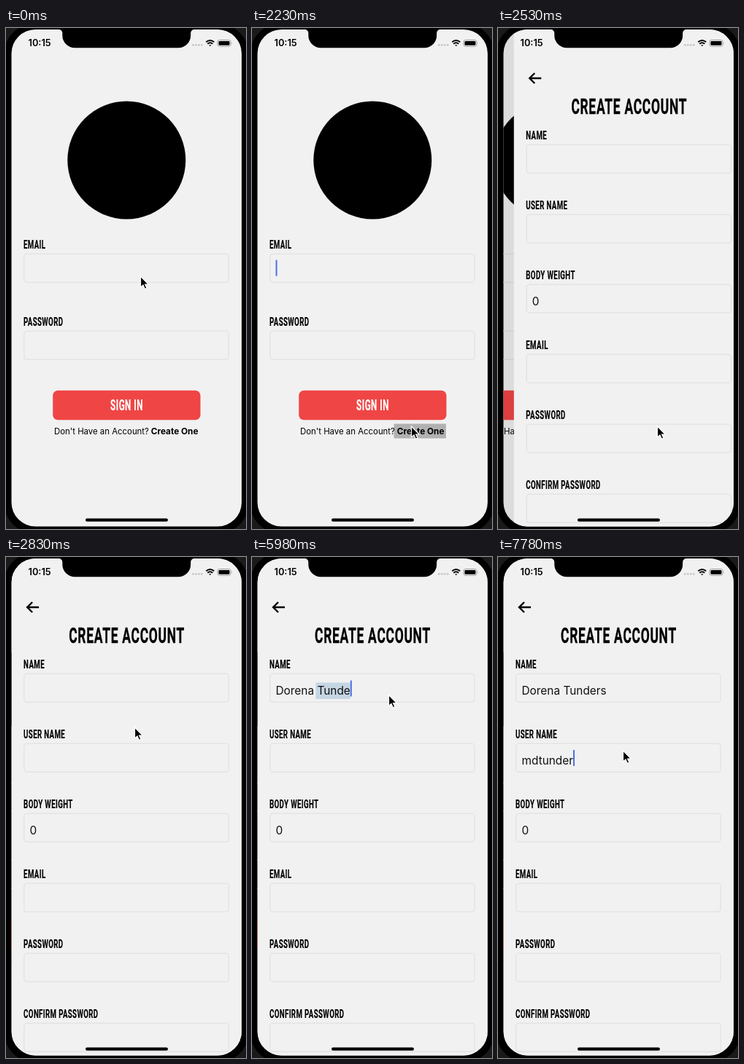
Animation, 329 px wide and 688 px high, one loop 8000 ms. Source, as an HTML page:

```html
<!DOCTYPE html>
<html lang="en">
<head>
<meta charset="utf-8">
<title>Create account</title>
<style>
html, body { margin: 0; width: 100%; height: 100%; overflow: hidden; background: #000; }
svg { display: block; width: 329px; height: 688px; }
text { font-family: Inter, "Liberation Sans", sans-serif; white-space: pre; }
.caps {
  font-family: Roboto, "Liberation Sans", sans-serif; font-weight: 700; letter-spacing: .04em;
  fill: currentColor; stroke: currentColor; stroke-width: .012em;
}
.input { font-size: 15.4px; fill: #111; }
.box { fill: none; stroke: #e4e4e6; stroke-width: 1.5; }
</style>
</head>
<body>
<svg viewBox="0 0 329 688">
  <defs>
    <clipPath id="glass"><rect x="7.5" y="2" width="315.5" height="682.5" rx="33"/></clipPath>
  </defs>
  <rect width="329" height="688" fill="#1a1a1a"/>
  <rect x="-3" y="-7" width="336" height="702" rx="44"/>
  <g clip-path="url(#glass)">
    <rect width="329" height="688" fill="#f1f1f1"/>
    <g id="login">
      <circle cx="165.3" cy="181.5" r="81"/>
      <rect x="64.2" y="497.8" width="202.3" height="40.5" rx="7" fill="#f04545"/>
      <rect id="press" x="194.5" y="543.5" width="71.5" height="20" rx="1" fill="#b1b1b1"/>
      <text x="66" y="557.5" font-size="11.4">Don't Have an Account?</text>
      <text x="198.7" y="557.5" font-size="11.8" font-weight="700">Create One</text>
    </g>
    <rect id="dim" width="329" height="688"/>
    <g id="signup">
      <rect x="7.5" width="330" height="688" fill="#f1f1f1"/>
      <path d="M45 69H29.5M36 62L29 69L36 76" fill="none" stroke="#000" stroke-width="2.4"/>
      <rect id="mark" y="172.5" height="22.5" fill="#c5d6e3"/>
      <text id="name" class="input" x="32.5" y="189.2"></text>
      <text id="user" class="input" x="32.5" y="285.2"></text>
      <text class="input" x="32.5" y="381.2">0</text>
    </g>
    <rect id="caret" width="2" height="22" fill="#4b70e2"/>
  </g>

  <path d="M70 0V2H72.300A5 5 0 0 1 77.300 7V10.200A17 17 0 0 0 94.300 27.200H236.200A17 17 0 0 0 253.200 10.200V7A5 5 0 0 1 258.200 2H261V0Z"/>
  <text x="30.500" y="25.200" font-size="12.800" font-weight="600">10:15</text>
  <g id="dots" fill="#c6c6c8"></g>
  <path d="M274.300 19.300Q279.800 14.500 285.300 19.300M276.300 21.700Q279.800 18.700 283.300 21.700" fill="none" stroke="#000" stroke-width="1.900"/>
  <path d="M278.200 23.200H281.400L279.800 25.200Z"/>
  <rect x="290" y="16.500" width="18" height="8.800" rx="2.600" fill="none" stroke="#a0a0a0"/>
  <rect x="291.500" y="18" width="15" height="5.800" rx="1.400"/>
  <path d="M309.300 19.400Q310.700 20.900 309.300 22.400Z" fill="#a0a0a0"/>
  <rect x="109" y="673.500" width="113" height="4.300" rx="2.150"/>
  <path id="cursor" d="M0 0V15L3.500 12L5.800 17.300L8.500 16.200L6.100 11H10.800Z" stroke="#fff" stroke-width="1.200"/>
</svg>
<script>
const LOOP = 8000, STEP = 150, LEFT = 32.5, WIDTH = 315;
const FIRST = 'Dorena ', LAST = 'Tunders', USER = 'mdtunder';
const $ = id => document.getElementById(id);

function add(parent, tag, attrs, text = '') {
  const el = document.createElementNS('http://www.w3.org/2000/svg', tag);
  set(el, attrs);
  el.textContent = text;
  parent.append(el);
  return el;
}
function set(el, attrs) {
  for (const key in attrs) el.setAttribute(key, attrs[key]);
}
const show = (el, on) => set(el, { visibility: on ? 'visible' : 'hidden' });

// Condensed capitals: one narrowing factor for the whole face
function caps(parent, text, x, y, size, anchor = 'start', color = '#000') {
  const g = add(parent, 'g', { transform: `translate(${x} ${y}) scale(.575 1)`, color });
  add(g, 'text', { class: 'caps', 'font-size': size, 'text-anchor': anchor }, text);
}

function field(parent, label, top) {
  const box = { class: 'box', x: 24.7, y: top + .3, width: 280.6, height: 39, rx: 4 };
  parent.insertBefore(add(parent, 'rect', box), parent.children[1]);
  caps(parent, label, 24, top - 7, 16.8);
}

['EMAIL', 'PASSWORD'].forEach((label, i) => field($('login'), label, 310 + 106 * i));
caps($('login'), 'SIGN IN', 165.5, 525, 20.4, 'middle', '#fff');
caps($('signup'), 'CREATE ACCOUNT', 165.5, 117.5, 30.4, 'middle');
['NAME', 'USER NAME', 'BODY WEIGHT', 'EMAIL', 'PASSWORD', 'CONFIRM PASSWORD']
  .forEach((label, i) => field($('signup'), label, 160 + 96 * i));
for (let i = 0; i < 4; i++) add($('dots'), 'circle', { cx: 256.3 + 4 * i, cy: 23.3, r: 1.4 });

const part = (t, from, to) => Math.min(1, Math.max(0, (t - from) / (to - from)));
const smooth = p => p * p * (3 - 2 * p);
const typed = (text, t, from, to) =>
  t < from ? '' : text.slice(0, Math.floor(1 + (text.length - 1) * part(t, from, to)));

// Pointer glides, each easing on from where the last one ended
const home = { x: 184.5, y: 341 };
const glides = [
  { from: 0, to: 580, x: 174, y: 311 },
  { from: 580, to: 1030, x: 174, y: 319 },
  { from: 1180, to: 2080, x: 218.5, y: 547 },
  { from: 2530, to: 2830, x: 176.5, y: 234 },
  { from: 2830, to: 3130, x: 187.5, y: 189.5 },
  { from: 6130, to: 6430, x: 171.5, y: 266 }
];
function pointer(t) {
  return glides.reduce((at, g) => {
    const p = smooth(part(t, g.from, g.to));
    return { x: at.x + (g.x - at.x) * p, y: at.y + (g.y - at.y) * p };
  }, home);
}

// Critically damped spring from 0 to 1
function spring(t) {
  const k = Math.max(0, t) * .018;
  return 1 - (1 + k) * Math.exp(-k);
}

const pen = document.createElement('canvas').getContext('2d');
pen.font = '15.4px Inter, "Liberation Sans", sans-serif';
const endOf = text => LEFT + pen.measureText(text).width;

function draw(t) {
  const { x, y } = pointer(t);
  set($('cursor'), { transform: `translate(${x} ${y})` });

  const pushed = spring(t - 2260);
  set($('signup'), { transform: `translate(${WIDTH * (1 - pushed)} 0)` });
  set($('login'), { transform: `translate(${-.3 * WIDTH * pushed} 0)` });
  set($('dim'), { opacity: .09 * pushed });
  show($('signup'), pushed > 0);
  show($('press'), t >= 2230 && t < 2530);

  const last = typed(LAST.slice(0, 5), t, 5080, 5680) + typed(LAST.slice(5), t, 6130, 6280);
  const name = typed(FIRST, t, 4030, 4780) + last;
  const user = typed(USER, t, 7030, 7780);
  $('name').textContent = name;
  $('user').textContent = user;

  const markLeft = endOf(FIRST) - 2;
  set($('mark'), { x: markLeft, width: Math.max(0, endOf(name) - markLeft) });
  show($('mark'), t >= 5980 && t < 6130);

  const onLogin = t < 2380, onUser = t >= 6730;
  show($('caret'), onLogin ? t >= 880 : t >= 3430);
  set($('caret'), {
    x: endOf(onLogin ? '' : onUser ? user : name),
    y: onLogin ? 318.5 : onUser ? 265 : 169.5
  });
}

const held = t => Math.max(0, 130 + STEP * Math.floor((t - 130) / STEP));

const start = performance.now();
function tick() {
  draw(held((performance.now() - start) % LOOP));
  requestAnimationFrame(tick);
}
tick();
</script>
</body>
</html>
```
